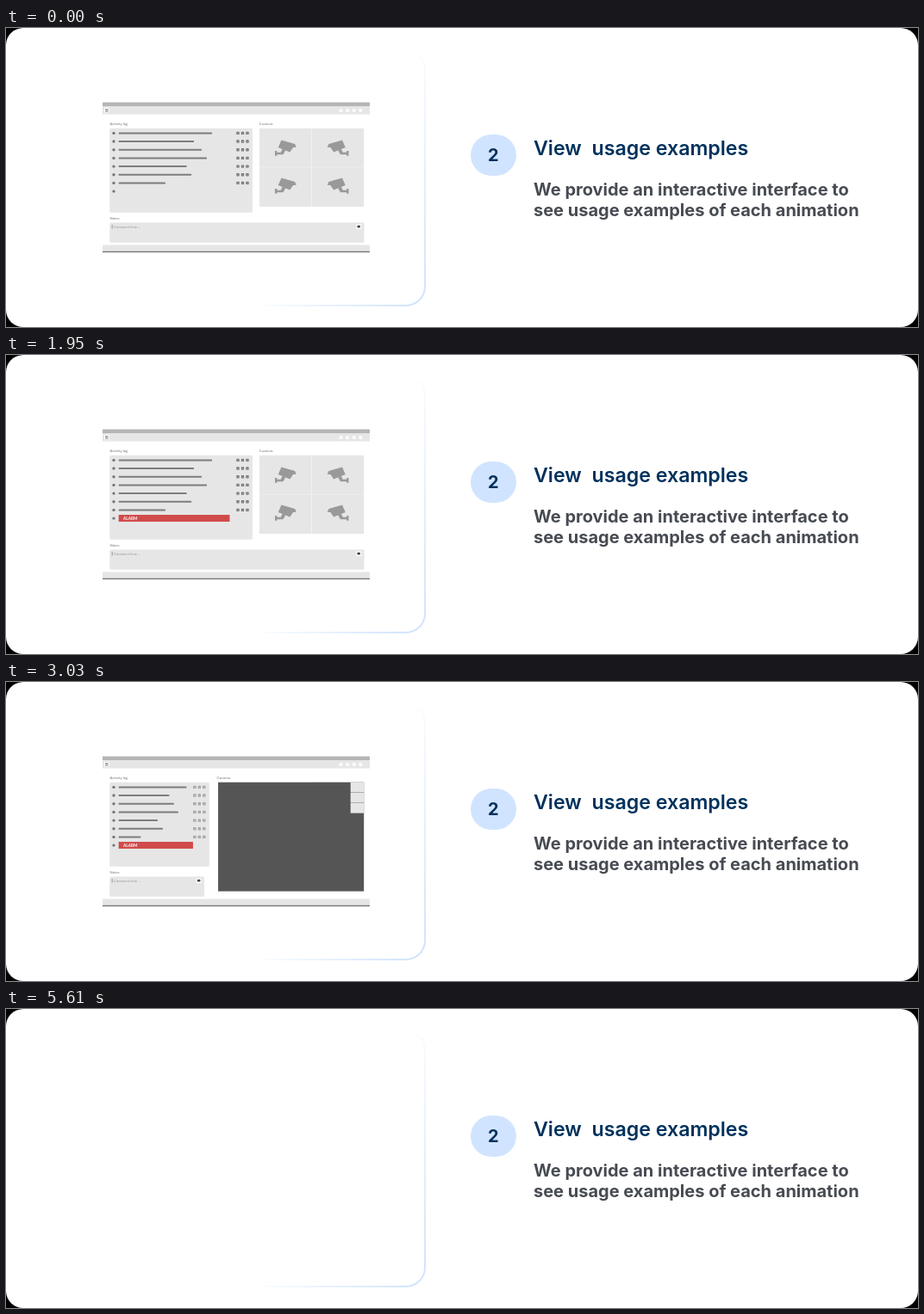
Animation of 1058x348 px, one loop 5640 ms. Source, as an HTML page:

```html
<!DOCTYPE html>
<html lang="en">
<head>
<meta charset="utf-8">
<title>View usage examples</title>
<style>
  html, body { margin: 0; height: 100%; overflow: hidden; background: #000; }
  svg { display: block; width: 100vw; height: 100vh; }
  text { white-space: pre; font-family: Inter, sans-serif; }
  .title { font-size: 23.2px; font-weight: 600; fill: #00315c; }
  .body { font-size: 20px; font-weight: 700; fill: #474b52; }
  #screen text { font: 4.2px Lato, sans-serif; fill: #777; }
  #screen .caps { font-weight: 700; fill: #fff; }
  .light { fill: #e6e6e6; }
  .mark { fill: #777; }
</style>
</head>
<body>
<svg viewBox="0 0 1058 348">
  <defs>
    <linearGradient id="fade" gradientUnits="userSpaceOnUse" x1="486" y1="323" x2="336.5" y2="228">
      <stop stop-color="#cde3fd"/>
      <stop offset="1" stop-color="#cde3fd" stop-opacity="0"/>
    </linearGradient>
    <path id="camera" d="M22 0L68 13L73 24L62 25L51 41L11 25ZM0 37h7v17H0ZM7 42H20L25 31L36 35L28 49H7Z"/>
  </defs>

  <rect width="1058" height="348" rx="20" fill="#fff"/>
  <path d="M476 30Q486 34 486 48V301A22 22 0 0 1 464 323H298" fill="none" stroke="url(#fade)" stroke-width="2"/>
  <rect x="539" y="124" width="53" height="48" rx="24" fill="#d1e4ff"/>
  <text x="565.2" y="155" text-anchor="middle" style="font-size:20px;font-weight:700;fill:#00315c">2</text>
  <text class="title" x="612" y="148">View  usage examples</text>
  <text class="body" x="612" y="195">We provide an interactive interface to</text>
  <text class="body" x="612" y="219">see usage examples of each animation</text>

  <g id="screen">
    <rect x="112" y="86.5" width="310" height="4.5" fill="#b5b5b5"/>
    <rect class="light" x="112" y="91" width="310" height="9.5"/>
    <rect x="114" y="93" width="5.6" height="5.6" rx=".6" fill="#fff"/>
    <path d="M115 94.6h3.6m-3.6 1.3h3.6m-3.6 1.3h3.6" stroke="#666" stroke-width=".7"/>
    <path d="M388.5 96h0m7.6 0h0m7.6 0h0m7.6 0h0" stroke="#fafafa" stroke-width="4.4" stroke-linecap="round"/>
    <rect class="light" x="112" y="252.5" width="310" height="7.5"/>
    <rect x="112" y="259.8" width="310" height="1.4" fill="#777"/>

    <text x="120.5" y="112.6">Activity log</text>
    <text x="120.5" y="223.4">Notes</text>
    <text id="label" y="112.6">Cameras</text>

    <rect id="log" class="light" x="120.3" y="116.7" height="98" rx="1.5"/>
    <g id="rows"></g>
    <rect id="bar" x="130.7" y="186" height="8" fill="#d14b4b"/>
    <text id="alarm" class="caps" x="136" y="191.7" style="font-size:4.7px">ALARM</text>

    <rect id="notes" class="light" x="120.3" y="226.6" height="23.2" rx="1.5"/>
    <path d="M123.2 229v4.6" stroke="#777" stroke-width=".7"/>
    <text x="125" y="232.6" style="fill:#999">Comment here ...</text>
    <g id="send">
      <rect x="-3" y="228.4" width="6" height="5.6" rx="1" fill="#fff"/>
      <rect x="-1.8" y="229.8" width="3.6" height="2.8" rx="1" fill="#444"/>
    </g>

    <rect class="light" x="354.8" y="116.7" width="60.4" height="45.2"/>
    <use href="#camera" fill="#999" transform="translate(397.5 130.5) scale(-.34 .34)"/>
    <rect id="dark" y="116.7" fill="#555"/>
    <g id="cells"></g>

    <g id="final">
      <use href="#camera" fill="#613030" transform="translate(290 141)"/>
      <rect x="257" y="217" width="66" height="16" fill="#d14b4b"/>
      <text class="caps" x="290.3" y="227.2" text-anchor="middle" style="font-size:6.2px">TURN OFF LINE 1</text>
      <text class="caps" x="342" y="227.2" style="font-size:6px">SKIP ALARM</text>
    </g>
  </g>
</svg>

<script>
const LOOP = 5640;
const $ = id => document.getElementById(id);
const set = (el, attrs) => { for (const k in attrs) el.setAttribute(k, attrs[k]); };
const mix = (a, b, p) => a + (b - a) * p;
const ramp = (t, from, to) => Math.min(1, Math.max(0, (t - from) / (to - from)));
const easeOut = p => p * (2 - p);
const easeInOut = p => (1 - Math.cos(Math.PI * p)) / 2;

// Log line ends before and after the panel narrows
const lines = [[239, 206], [218, 186], [227, 191], [233, 196], [209.5, 172], [215, 178], [185, 153]];
const rowY = i => 122.4 + i * 9.67;

$("rows").innerHTML = lines.map((_, i) => `
  <circle class="mark" cx="125" cy="${rowY(i)}" r="1.7"/>
  <rect class="line" x="130.7" y="${rowY(i) - 1}" height="2" rx=".5" fill="#7d7d7d"/>`).join("") +
  `<circle class="mark" cx="125" cy="${rowY(7)}" r="1.7"/>` +
  `<g id="icons">${lines.map((_, i) => [-17, -11.5, -6].map(x =>
    `<rect class="mark" x="${x - 1.7}" y="${rowY(i) - 1.7}" width="3.4" height="3.4" rx=".7"/>
     <path d="M${x - .7} ${rowY(i) + .3}h1.5" stroke="#ccc" stroke-width=".6"/>`).join("")).join("")}</g>` +
  `<g id="more">${lines.map((_, i) => [220.3, 222, 223.7].map(x =>
    `<circle class="mark" cx="${x}" cy="${rowY(i)}" r=".65"/>`).join("")).join("")}</g>`;

// Each cell as left, top, right, bottom: in the grid, then in the side strip
const cells = [
  { grid: [294, 116.7, 354.4, 161.9], strip: [399.7, 116.7, 415.2, 128.5], cam: "translate(312 130.5) scale(.34)" },
  { grid: [294, 162.2, 354.4, 208], strip: [399.7, 128.8, 415.2, 140.5], cam: "translate(312 174.5) scale(.34)" },
  { grid: [354.8, 162.2, 415.2, 208], strip: [399.7, 140.8, 415.2, 152.6], cam: "translate(397.5 174.5) scale(-.34 .34)" }
];
$("cells").innerHTML = cells.map((c, i) => `
  <clipPath id="clip${i}"><rect class="cell${i}"/></clipPath>
  <rect class="light cell${i}"/>
  <g clip-path="url(#clip${i})"><use href="#camera" fill="#999" transform="${c.cam}"/></g>
  <use class="mini" href="#camera" fill="#888" transform="translate(412 ${119.5 + 12 * i}) scale(-.125 .125)"/>`).join("");

const lineEls = document.querySelectorAll(".line");
const minis = document.querySelectorAll(".mini");
const cellEls = cells.map((_, i) => document.querySelectorAll(".cell" + i));

function render(t) {
  const narrow = easeOut(ramp(t, 2625, 3225));
  const grow = easeInOut(ramp(t, 2625, 3165));
  const shrink = ramp(t, 2625, 3010);
  const alarm = ramp(t, 1020, 1560);
  const reveal = ramp(t, 3255, 3660);

  $("screen").style.display = t < 5610 ? "" : "none";

  const edge = mix(286, 230, narrow);
  set($("log"), { width: edge - 120.3 });
  set($("label"), { x: mix(293.7, 238.7, narrow) });
  lineEls.forEach((el, i) => set(el, { width: mix(...lines[i], narrow) - 130.7 }));
  set($("icons"), { transform: `translate(${edge} 0)`, opacity: 1 - ramp(t, 2850, 3300) });
  set($("more"), { opacity: reveal });
  set($("bar"), { width: mix(259.5, 212, narrow) - 130.7, opacity: alarm });
  set($("alarm"), { opacity: alarm });

  const notesEdge = mix(415.5, 230, shrink);
  set($("notes"), { width: notesEdge - 120.3 });
  set($("send"), { transform: `translate(${notesEdge - 6.3} 0)`, opacity: Math.abs(1 - 2 * shrink) });

  const left = mix(294, 238, grow);
  set($("dark"), {
    x: left, width: 415.2 - left, height: mix(208, 249.6, grow) - 116.7,
    opacity: ramp(t, 2625, 2690)
  });
  cells.forEach((c, i) => {
    const [x, y, r, b] = c.grid.map((v, k) => mix(v, c.strip[k], shrink));
    cellEls[i].forEach(el => set(el, { x, y, width: r - x, height: b - y }));
  });
  minis.forEach(el => set(el, { opacity: reveal }));
  set($("final"), { opacity: reveal });
}

const start = performance.now();
function tick() {
  render((performance.now() - start) % LOOP);
  requestAnimationFrame(tick);
}
tick();
</script>
</body>
</html>
```
